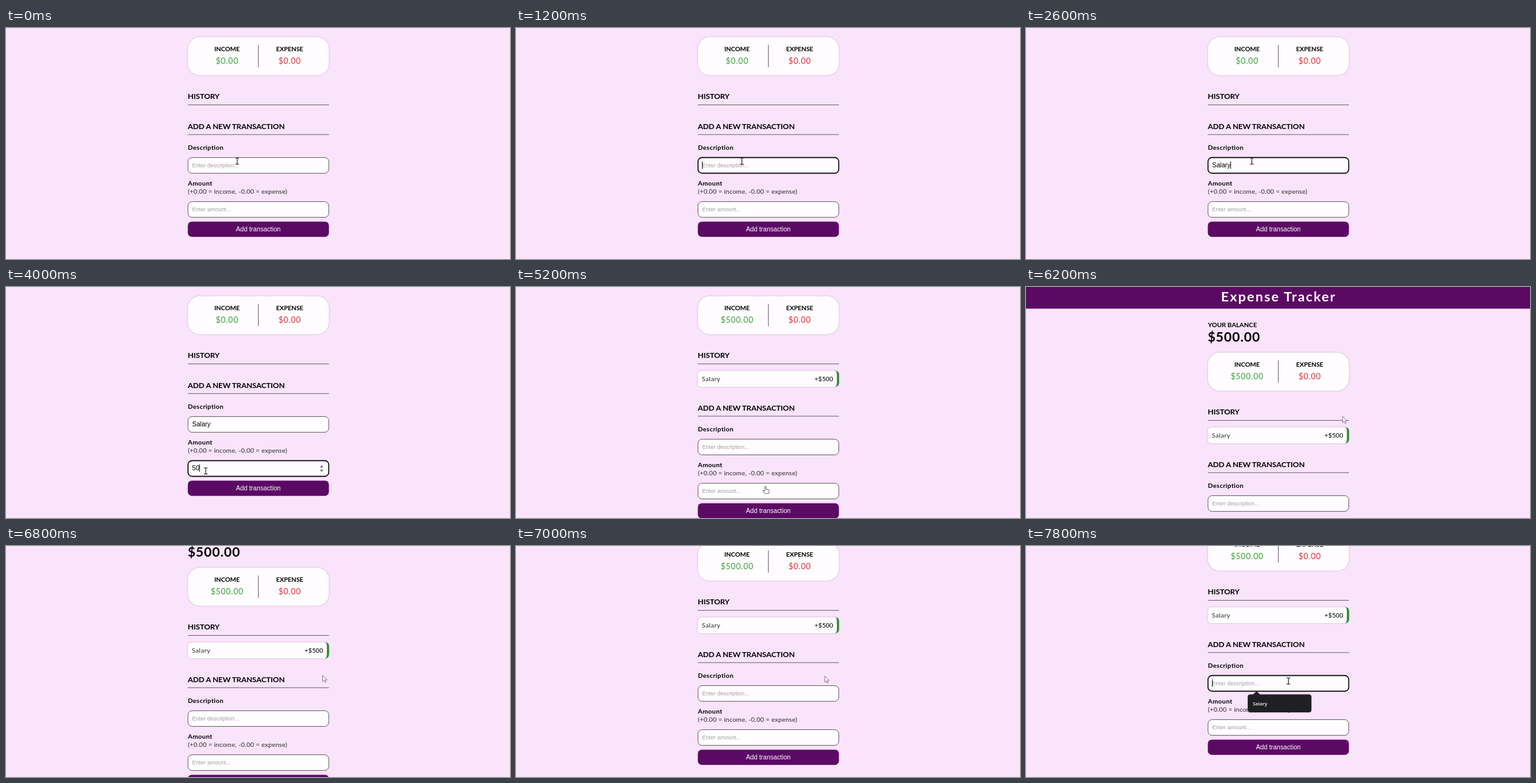
An HTML page for the animation above (8000 ms loop, 800 by 368 pixels).

```html
<!DOCTYPE html>
<html lang="en">
<head>
<meta charset="utf-8">
<title>Expense Tracker</title>
<style>
  html, body { margin: 0; width: 100%; height: 100%; overflow: hidden; background: #fae4fc; }
  svg { display: block; width: 800px; height: 368px; }
  text { font: 10.24px Lato, sans-serif; fill: #000; white-space: pre; }
  .b { font-weight: 700; }
  .heading { font-size: 12px; font-weight: 700; letter-spacing: -.1px; }
  .label { font-weight: 700; letter-spacing: .35px; }
  .hint { letter-spacing: .16px; fill: #2c2a2c; }
  .item { letter-spacing: .4px; fill: #2c2a2c; }
  .caps { font-size: 10.1px; font-weight: 700; letter-spacing: -.1px; }
  .money { font-size: 12.8px; letter-spacing: .64px; }
  .income { fill: #37a037; }
  .expense { fill: #dc3038; }
  .balance { font-size: 21px; font-weight: 700; letter-spacing: .8px; }
  .title { font-size: 21.5px; font-weight: 700; letter-spacing: 1.85px; fill: #fff; }
  .mid { text-anchor: middle; }
  .end { text-anchor: end; }
  .ui { font: 10.24px "Liberation Sans", Arial, sans-serif; }
  .light { fill: #fff; }
  .placeholder { font-size: 8.96px; fill: #a3a0a3; }
  .rule { stroke: #6a646a; }
  .box { fill: #fffdff; stroke: #625e62; }
  .box.focus { stroke: #080808; stroke-width: 1.6; }
  .white { fill: #fffdff; }
  .shadow { filter: drop-shadow(0 .7px .8px rgba(60, 40, 60, .32)); }
  .purple { fill: #5b0a64; }
  .popup text { font: 600 7.8px "Open Sans", sans-serif; fill: #f4f4f4; }
</style>
</head>
<body>
<svg viewBox="0 0 800 368">
  <g id="page">
    <rect class="purple" y="-160" width="800" height="104.5"/>
    <text class="title mid" x="401" y="-67">Expense Tracker</text>
    <text class="b" x="288.7" y="-25.8">YOUR BALANCE</text>
    <text class="balance" x="288.4" y="-3">$500.00</text>

    <rect class="shadow white" x="288.7" y="14.6" width="223.8" height="60.6" rx="19"/>
    <path class="rule" d="M400.5 27V62.5"/>
    <text class="caps mid" x="350.8" y="37.4">INCOME</text>
    <text class="caps mid" x="450.3" y="37.4">EXPENSE</text>
    <text class="money income mid" id="income" x="351" y="56.6">$0.00</text>
    <text class="money expense mid" x="450.4" y="56.6">$0.00</text>

    <text class="heading" x="288.6" y="113.3">HISTORY</text>
    <path class="rule" d="M288.6 122.5H512.6"/>
    <g id="entry">
      <g class="shadow">
        <path fill="#1f8a24" d="M506 133.4Q512.6 133.4 512.6 139.8V152.6Q512.6 159 506 159Z"/>
        <path class="white" d="M294.6 133.4H506.2Q509.4 133.8 509.4 139.8V152.6Q509.4 158.6 506.2 159H294.6Q288.6 159 288.6 153V139.4Q288.6 133.4 294.6 133.4Z"/>
      </g>
      <text class="item" x="295" y="150">Salary</text>
      <text class="end" x="503.5" y="150">+$500</text>
    </g>

    <g id="form">
      <text class="heading" x="288.6" y="160.8">ADD A NEW TRANSACTION</text>
      <path class="rule" d="M288.6 169.8H512.6"/>
      <text class="label" x="288.7" y="193.5">Description</text>
      <g id="description"></g>
      <text class="label" x="288.7" y="251.2">Amount</text>
      <text class="hint" x="288.7" y="264">(+0.00 = income, -0.00 = expense)</text>
      <g id="amount"></g>
      <path id="spinner" fill="#77747a" d="M498.3 287.6L501 283.8L503.7 287.6ZM498.3 291L501 294.8L503.7 291Z"/>
      <rect class="purple" x="288.6" y="308.5" width="224" height="24.2" rx="6.4"/>
      <text class="ui light mid" x="400.5" y="324.3">Add transaction</text>
    </g>
  </g>

  <g id="popup" class="popup">
    <path class="shadow" fill="#202022" d="M356 236.5H360.5L366 231.6L371.5 236.5H449Q453 236.5 453 240.5V261Q453 265 449 265H356Q352 265 352 261V240.5Q352 236.5 356 236.5Z"/>
    <text x="360" y="253.8">Salary</text>
  </g>

  <g id="cursor">
    <path id="beam" fill="none" stroke="#1a1a1a" stroke-width="1.1" d="M-3 -5H-1Q0 -5 0 -4Q0 -5 1 -5H3M0 -4V4M-3 5H-1Q0 5 0 4Q0 5 1 5H3"/>
    <path id="arrow" fill="#fdf6fe" stroke="#6b666b" stroke-width=".8" d="M0 0V10L2.4 7.8L4 11.4L5.6 10.6L4.1 7.2H7.2Z"/>
    <path id="hand" fill="#fff" stroke="#444" stroke-width=".8" d="M-1 5V0Q0 -1 1 0V4L5 5Q6 5 6 7L5 11H-1L-4 7Q-4 5 -1 7Z"/>
  </g>
</svg>
<script>
const $ = id => document.getElementById(id);
const LOOP = 8000, STEP = 200;
const SUBMIT = 5200, ENTRY_HEIGHT = 36;

// [time, x, y, shape]
const pointer = [
  [0, 367, 212, 'beam'], [600, 362, 213, 'beam'], [1200, 358.5, 212, 'beam'],
  [2600, 358.5, 212, 'beam'], [2800, 352, 226, 'beam'], [3000, 334, 262, 'beam'],
  [3200, 319, 290, 'beam'], [3400, 317, 293, 'beam'], [4400, 317, 293, 'beam'],
  [4600, 348, 304, 'arrow'], [4800, 392, 317, 'hand'], [5200, 396, 318, 'hand'],
  [5400, 408, 300, 'arrow'], [5800, 477, 223, 'arrow'], [6000, 495, 211, 'arrow'],
  [6200, 502.5, 206, 'arrow'], [6800, 502.5, 206, 'arrow'], [7000, 490, 207, 'arrow'],
  [7200, 452, 211, 'beam'], [7400, 420, 215, 'beam'], [7600, 416.5, 215, 'beam'],
  [8000, 416.5, 215, 'beam']
];

// [time, offset]
const scroll = [
  [0, 0], [5800, 0], [6000, -45], [6200, -90], [6400, -90],
  [6600, -64], [6800, -20], [7000, 20], [7200, 36], [8000, 36]
];

// [time, field]
const focus = [[0, ''], [800, 'description'], [3400, 'amount'], [5000, ''], [7600, 'description']];

function makeField(id, top, placeholder) {
  $(id).innerHTML = `
    <rect class="box" x="288.9" y="${top}" width="223.4" height="25" rx="6.4"/>
    <text class="ui" x="295.6" y="${top + 15.8}"></text>
    <rect width="1" height="12" y="${top + 6}"/>`;
  const [box, text, caret] = $(id).children;
  return (value, focused) => {
    box.classList.toggle('focus', focused);
    text.classList.toggle('placeholder', !value);
    text.textContent = value || placeholder;
    show(caret, focused);
    caret.setAttribute('x', 295.3 + (value ? text.getComputedTextLength() : 0));
  };
}

const setDescription = makeField('description', 206.4, 'Enter description...');
const setAmount = makeField('amount', 276.6, 'Enter amount...');

function show(el, on) { el.style.display = on ? '' : 'none'; }
function move(el, x, y) { el.setAttribute('transform', `translate(${x} ${y})`); }
function latest(keys, t) { return keys.filter(k => k[0] <= t).pop(); }

function between(keys, t, column) {
  const a = latest(keys, t), b = keys[keys.indexOf(a) + 1] || a;
  const part = a === b ? 0 : (t - a[0]) / (b[0] - a[0]);
  return a[column] + (b[column] - a[column]) * part;
}

function typed(word, start, t) {
  if (t >= SUBMIT) return '';
  return word.slice(0, Math.max(0, Math.floor((t - start) / STEP) + 1));
}

function draw(t) {
  const saved = t >= SUBMIT, field = latest(focus, t)[1];
  $('income').textContent = saved ? '$500.00' : '$0.00';
  show($('entry'), saved);
  move($('form'), 0, saved ? ENTRY_HEIGHT : 0);
  move($('page'), 0, -between(scroll, t, 1));

  setDescription(typed('Salary', 1400, t), field === 'description');
  setAmount(typed('500', 3800, t), field === 'amount');
  show($('spinner'), field === 'amount');
  show($('popup'), t >= 7600);

  const shape = latest(pointer, t)[3];
  for (const name of ['beam', 'arrow', 'hand']) show($(name), name === shape);
  move($('cursor'), between(pointer, t, 1), between(pointer, t, 2));
}

const start = performance.now();
function tick() {
  const t = (performance.now() - start) % LOOP;
  draw(Math.floor(t / STEP) * STEP);
  requestAnimationFrame(tick);
}
tick();
</script>
</body>
</html>
```
